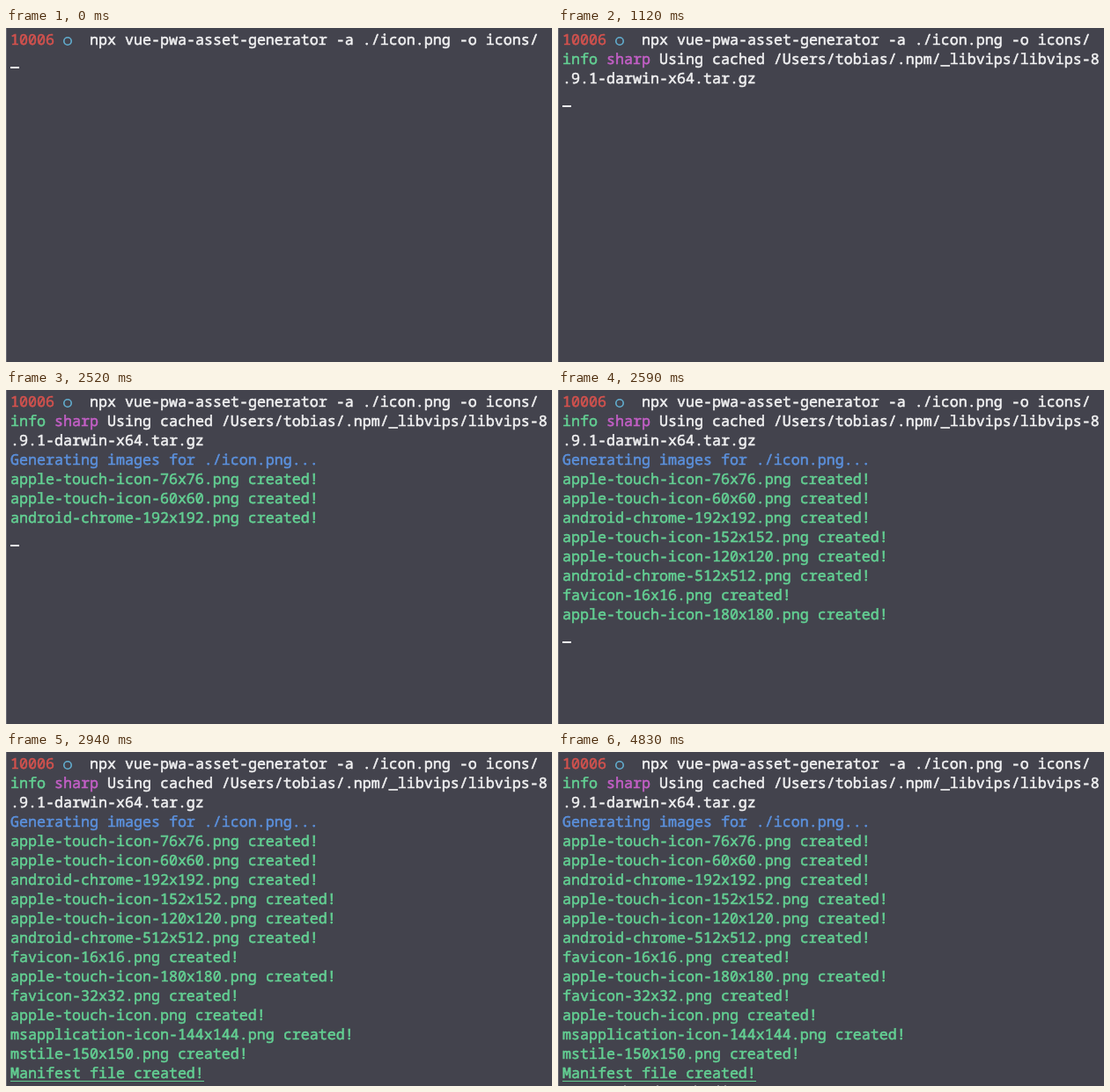
Animation, 620 px wide and 380 px high, one loop 5.25 s. Source, as an HTML page:

```html
<!DOCTYPE html>
<html lang="en">
<head>
<meta charset="utf-8">
<title>Terminal: asset generator</title>
<style>
  html, body { margin: 0; width: 100%; height: 100%; overflow: hidden; background: #43434d; }
  svg { display: block; color: #f1f1f2; }
  text {
    font: 500 16.667px "Noto Sans Mono", "DejaVu Sans Mono", monospace;
    white-space: pre;
    text-rendering: geometricPrecision;
  }
  /* A thin outline gives the medium weight of the terminal type. */
  text, tspan { fill: currentColor; stroke: currentColor; stroke-width: 0.55px; }
  .red { color: #d3524e; }
  .green { color: #63d093; }
  .pink { color: #c35fc6; }
  .blue { color: #5b90dc; }

  /* Output arrives in bursts, each a hard cut within one 5250 ms loop. */
  .step { visibility: hidden; animation: 5250ms step-end infinite; }
  .install { animation-name: install; }
  .first { animation-name: first; }
  .second { animation-name: second; }
  .third { animation-name: third; }
  .manifest { animation-name: manifest; }
  .next { animation-name: next; }
  @keyframes install { 5.333%, 100% { visibility: visible; } }
  @keyframes first { 48%, 100% { visibility: visible; } }
  @keyframes second { 49.333%, 100% { visibility: visible; } }
  @keyframes third { 50.666%, 100% { visibility: visible; } }
  @keyframes manifest { 54.666%, 100% { visibility: visible; } }
  @keyframes next { 72%, 100% { visibility: visible; } }

  .cursor { animation: cursor 5250ms step-end infinite; }
  @keyframes cursor {
    0% { transform: translateY(0); }
    5.333% { transform: translateY(44px); }
    48% { transform: translateY(132px); }
    49.333% { transform: translateY(242px); }
    50.666% { transform: translateY(330px); }
    54.666%, 100% { transform: translateY(352px); }
  }
</style>
</head>
<body>
<svg width="620" height="380" viewBox="0 0 620 380">
  <rect width="620" height="380" fill="#43434d"/>
  <rect width="1" height="380" fill="#696973"/>

  <text x="5" y="19" class="red">10006</text>
  <circle cx="70" cy="15" r="4.2" fill="none" stroke="#62aed0" stroke-width="1.6"/>
  <text x="95" y="19">npx vue-pwa-asset-generator -a ./icon.png -o icons/</text>

  <g class="step install">
    <text x="5" y="41"><tspan class="green">info</tspan> <tspan class="pink">sharp</tspan> Using cached /Users/tobias/.npm/_libvips/libvips-8</text>
    <text x="5" y="63">.9.1-darwin-x64.tar.gz</text>
  </g>

  <text x="5" y="85" class="blue step first">Generating images for ./icon.png...</text>
  <g id="images"></g>

  <g class="step manifest">
    <text x="5" y="371" class="green">Manifest file created!</text>
    <rect x="5" y="374" width="220" height="1" fill="#63d093"/>
  </g>

  <!-- Tops of the following line, cut off by the window edge -->
  <path class="step next" d="M75 379.5h2M112 379.5h2M155 379.5h2M181 379.5h2M189 379.5h2" stroke="#8a8a92"/>
  <rect class="cursor" x="5" y="44" width="10" height="2" fill="#f1f1f2"/>
</svg>
<script>
  const bursts = {
    first: ["apple-touch-icon-76x76", "apple-touch-icon-60x60", "android-chrome-192x192"],
    second: ["apple-touch-icon-152x152", "apple-touch-icon-120x120", "android-chrome-512x512",
      "favicon-16x16", "apple-touch-icon-180x180"],
    third: ["favicon-32x32", "apple-touch-icon", "msapplication-icon-144x144", "mstile-150x150"]
  };
  const lineHeight = 22;
  let baseline = 107;
  let markup = "";
  for (const [burst, names] of Object.entries(bursts)) {
    for (const name of names) {
      markup += `<text x="5" y="${baseline}" class="green step ${burst}">${name}.png created!</text>`;
      baseline += lineHeight;
    }
  }
  document.getElementById("images").innerHTML = markup;
</script>
</body>
</html>
```
